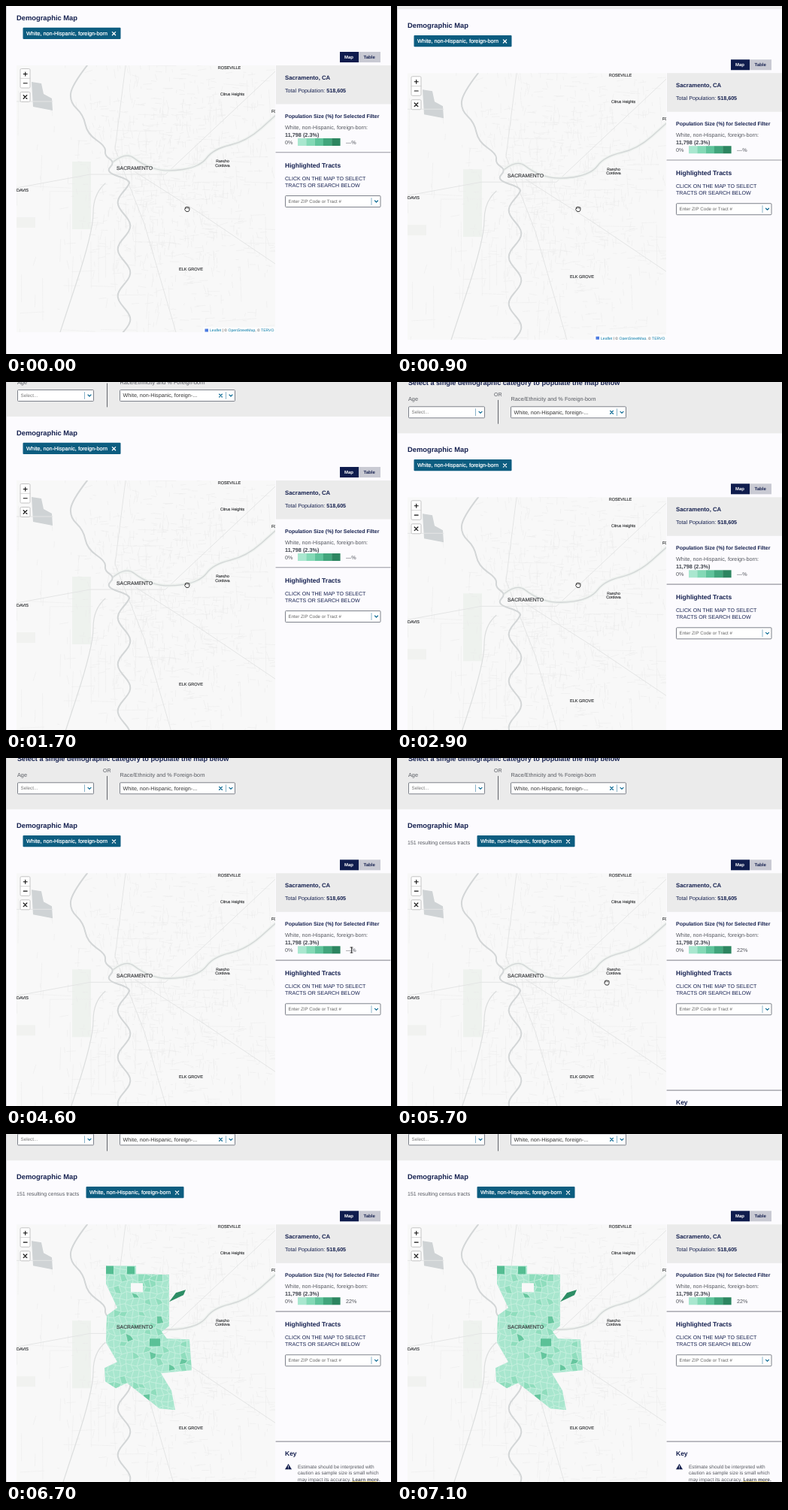
Animation of 512x463 px, one loop 7200 ms. Source, as an HTML page:

```html
<!DOCTYPE html>
<html lang="en">
<head>
<meta charset="utf-8">
<title>Demographic Map</title>
<style>
  html, body { margin: 0; width: 100%; height: 100%; overflow: hidden; background: #fcfbfe; }
  svg { display: block; width: 512px; height: 463px; }
  text { font-family: "Liberation Sans", Arial, sans-serif; text-rendering: geometricPrecision; white-space: pre; }
  path { fill: none; stroke-linecap: round; stroke-linejoin: round; }
</style>
</head>
<body>
<svg id="stage" viewBox="0 0 512 463"></svg>
<script>
const NAVY = '#15204f', GREY = '#55585f', BLUE = '#0c6a94', WATER = '#d3d6d7';
const LOOP = 7200, STEP = 100;
const RESULTS_AT = 4700, TRACTS_AT = 6700;

let seed = 11;
const rnd = () => (seed = (seed * 16807) % 2147483647) / 2147483647;
const spread = () => rnd() + rnd() + rnd() - 1.5;

const rect = (x, y, w, h, fill, extra = '') =>
  `<rect x="${x}" y="${y}" width="${w}" height="${h}" fill="${fill}" ${extra}/>`;
const path = (d, stroke, width = 1) => `<path d="${d}" stroke="${stroke}" stroke-width="${width}"/>`;
const poly = (points, fill, extra = '') => `<polygon points="${points}" fill="${fill}" ${extra}/>`;

// y is the middle of the capital letters
const text = (x, y, size, content, fill = GREY, extra = '') =>
  `<text x="${x}" y="${y + size * .36}" font-size="${size}" fill="${fill}" ${extra}>${content}</text>`;
const bold = (x, y, size, content, fill = NAVY) => text(x, y, size, content, fill, 'font-weight="700"');
const place = (x, y, size, content) =>
  text(x, y, size, content, '#3f4043', 'text-anchor="middle" stroke="#3f4043" stroke-width=".2"');

const chevron = (x, y) => path(`M${x - 2} ${y - 1}l2 2 2-2`, BLUE, 1.2);
const cross = (x, y, r, stroke) =>
  path(`M${x - r} ${y - r}l${2 * r} ${2 * r}m0 ${-2 * r}l${-2 * r} ${2 * r}`, stroke, 1.3);
const button = (y, h) => rect(19, y, 13, h, '#fff', 'stroke="#c4c4c4" rx="1.5"');

function curve(points, stroke, width) {
  let d = 'M' + points[0];
  for (let i = 1; i < points.length - 1; i++) {
    const [x, y] = points[i], [nx, ny] = points[i + 1];
    d += `Q${x} ${y} ${(x + nx) / 2} ${(y + ny) / 2}`;
  }
  return path(d + 'L' + points[points.length - 1], stroke, width);
}

function select(x, y, w, label, size, fill) {
  return rect(x + .5, y + .5, w - 1, 15, '#fff', 'stroke="#70747e" stroke-width=".9" rx="1"') +
    text(x + 4.5, y + 7.8, size, label, fill) +
    path(`M${x + w - 12.5} ${y + 3.5}v9`, '#6ba0bb', .8) + chevron(x + w - 6, y + 8);
}

function streets() {
  const line = (x, y, len, tilt) => rnd() < .5 ? `M${x} ${y}l${len} ${tilt}` : `M${x} ${y}l${-tilt} ${len}`;
  let main = '', fine = '';
  for (let i = 0; i < 90; i++)
    main += line(14 + rnd() * 344, 79 + rnd() * 355, 12 + rnd() * 50, spread() * 3);
  for (let i = 0; i < 1100; i++) {
    const len = 2 + rnd() * 10;
    fine += line(225 + spread() * 135, 225 + spread() * 190, len, len * spread() * .3);
  }
  return path(main, '#ececec', .6) + path(fine, '#e8e9e9', .5);
}

function rivers() {
  const sacramento = [[108, 79], [87, 106], [85, 128], [103, 145], [108, 170], [133, 187], [131, 199],
    [145, 208], [132, 221]];
  for (let y = 232; y <= 440; y += 8)
    sacramento.push([157 + 9 * Math.sin((y - 277) / 9.9), y]);
  const american = [[143, 207], [160, 194], [181, 211], [212, 221], [258, 214], [276, 190], [320, 180], [358, 146]];
  const channel = [[132, 236], [116, 250], [116, 300], [72, 434]];
  return curve(channel, '#dcdede', 1.2) + curve(american, '#eef2ef', 4) +
    curve(american, WATER, 1.3) + curve(sacramento, WATER, 2);
}

// A jittered grid of shaded cells, cut to the city boundary
function tracts() {
  const outline = '133,134 173,134 173,145 217,146 217,214 207,222 214,231 244,232 247,273 206,277 ' +
    '220,300 225,326 204,324 161,290 146,297 132,288 131,270 148,262 133,236 134,200 148,190 133,158';
  const node = (c, r) => [
    128 + c * 8 + Math.sin(c * 7.1 + r * 3.7) * 2,
    130 + r * 8 + Math.sin(c * 4.3 + r * 8.9) * 2
  ].map(v => v.toFixed(1)).join();
  let cells = '';
  for (let r = 0; r < 25; r++) for (let c = 0; c < 15; c++) {
    const k = rnd(), fill = k < .8 ? '#a8e6ce' : k < .97 ? '#8fddbd' : '#65c69e';
    cells += poly([node(c, r), node(c + 1, r), node(c + 1, r + 1), node(c, r + 1)].join(' '),
      fill, 'stroke="#c8f0e0" stroke-width=".6"');
  }
  return `<clipPath id="city"><polygon points="${outline}"/></clipPath>
    <g id="tracts"><g clip-path="url(#city)">${cells}
    ${rect(133, 134, 10, 11, '#54bd92')}${rect(161, 135, 10, 10, '#54bd92')}
    ${rect(191, 231, 14, 10, '#5bc197')}${rect(166, 157, 16, 12, '#f8f8f8')}</g>
    ${poly('217,182 226,170 239,166 236,173', '#2d8d65')}</g>`;
}

function map() {
  return `<clipPath id="frame">${rect(14, 79, 344, 355, '#000')}</clipPath><g clip-path="url(#frame)">` +
    rect(14, 79, 344, 355, '#f8f8f8') + rect(88, 207, 25, 90, '#eef2ee') + rect(14, 281, 25, 14, '#f1f2f0') +
    streets() + poly('34,101 47,103 50,117 61,123 62,139 36,134', '#cfd3d5') +
    path('M14 242L112 224H212L358 87M159 79L145 190 184 290 226 434M14 127H62M172 221L260 277 358 343', '#e4e5e5') +
    rivers() + tracts() +
    place(297, 82, 5.5, 'ROSEVILLE') + place(301, 117, 5.1, 'Citrus Heights') +
    place(364.5, 140, 5.5, 'FOLSOM') + place(288, 206.5, 5.1, 'Rancho') + place(288, 212, 5.1, 'Cordova') +
    place(171, 215.5, 6.8, 'SACRAMENTO') + place(22, 245, 5.5, 'DAVIS') + place(246, 350, 5.5, 'ELK GROVE') +
    rect(262, 427.5, 96, 7, '#fff', 'opacity=".75"') + rect(264.5, 429.5, 4.5, 4, '#4c7be1') +
    text(271, 431.6, 5.07, 'Leaflet<tspan fill="#444"> | © </tspan>OpenStreetMap' +
      '<tspan fill="#444">, © </tspan>TERVO', '#0078a8') +
    button(83.5, 25.5) + path('M19 96.3h13', '#ccc', .8) +
    path('M23.2 90.5h5M25.7 88v5M23.2 102.8h5', '#111', 1.1) +
    button(114.5, 13) + cross(25.5, 121, 2.3, '#222') + '</g>';
}

function filters() {
  return rect(0, -300, 512, 294, '#ebebeb') +
    bold(15, -74, 9.15, 'Select a single demographic category to populate the map below') +
    text(15, -51.5, 7.3, 'Age') + text(129, -58, 7, 'OR') +
    path('M134.5 -50v31', GREY, .9) +
    text(151.5, -51.5, 7.3, 'Race/Ethnicity and % Foreign-born') +
    select(15, -42, 102, 'Select...', 6.3, '#777') +
    select(151, -42, 154, 'White, non-Hispanic, foreign-...', 7.2, '#333') +
    cross(285.5, -34, 1.9, BLUE);
}

function heading() {
  return bold(14, 15.5, 9.35, 'Demographic Map') +
    `<g id="pill">${rect(22.5, 28.7, 130, 15.3, '#0d5d80', 'rx="1"')}` +
    text(27, 36.2, 7.25, 'White, non-Hispanic, foreign-born', '#fff', 'stroke="#fff" stroke-width=".2"') +
    cross(143.5, 36.7, 2.1, '#fff') + '</g>' +
    rect(444, 61, 25, 14, '#0f1c4d') + rect(469, 61, 29, 14, '#c9cad3') +
    bold(450, 68, 6, 'Map', '#fff') + bold(475.5, 68, 6, 'Table');
}

function panel() {
  const ramp = ['#a9e7cf', '#83d9b6', '#5fc39b', '#41a57c', '#2c8560'];
  const rule = y => path(`M359 ${y}h152`, '#97979f', 1.1);
  const note = ['Estimate should be interpreted with', 'caution as sample size is small which',
    'may impact its accuracy. <tspan font-weight="700">Learn more.</tspan>'];
  return rect(359, 79, 153, 51.5, '#ebebeb') +
    bold(371, 95, 7.8, 'Sacramento, CA') +
    text(371, 112, 7.2, 'Total Population: <tspan font-weight="700">518,605</tspan>', NAVY) +
    bold(371, 146, 6.97, 'Population Size (%) for Selected Filter') +
    text(371, 161.5, 7.25, 'White, non-Hispanic, foreign-born:') +
    bold(371, 171, 7.3, '11,798 (2.3%)', '#3f434c') +
    text(371, 181, 7.2, '0%') +
    ramp.map((c, i) => rect(388 + i * 11.3, 176, 11.4, 10, c)).join('') +
    `<g id="pending">${text(452, 181, 7.2, '—%')}</g>` +
    rule(194.8) +
    bold(371, 212, 8.5, 'Highlighted Tracts') +
    text(371, 229, 7.07, 'CLICK ON THE MAP TO SELECT', NAVY) +
    text(371, 238.5, 7.07, 'TRACTS OR SEARCH BELOW', NAVY) +
    select(371, 252, 127.5, 'Enter ZIP Code or Tract #', 6.2, '#666') +
    `<g id="results">${text(452, 181, 7.2, '22%')}${text(14, 38.5, 7, '151 resulting census tracts')}` +
    rule(367.8) + bold(371, 384, 8.5, 'Key') +
    poly('371,405 375.5,397.5 380,405', NAVY) + path('M375.5 400v2.4m0 1.3v.1', '#fff', .7) +
    note.map((s, i) => text(388, 401 + i * 8.5, 6.5, s)).join('') +
    path('M460 421.5h33', '#e8c94a', .9) + '</g>';
}

document.getElementById('stage').innerHTML =
  rect(0, 0, 512, 463, '#fcfbfe') +
  `<g id="page">${filters()}${heading()}${map()}${panel()}</g>` +
  path('M.5 0v463', '#d4d4d8') +
  `<g id="cursor"><g id="hand">
    <path d="M-2.6-.6V-2q.8-1 1.4 0 .3-1.4 1.4-.4 1-.8 1.4.3 1.3-.4 1.3.8V1Q2.6 2.3 1.8 3.4H-1.5L-3.4.6q0-1 .8-1.2z"
      style="fill:#fff" stroke="#222" stroke-width=".9"/>
    ${path('M-1.2-2v1.4M.2-2v1.4M1.6-1.8v1.2', '#222', .5)}</g>
    <g id="beam">${path('M-1.5-3.5h3M0-3.5v7M-1.5 3.5h3', '#222', .9)}</g></g>`;

const el = id => document.getElementById(id);
const show = (id, on) => el(id).setAttribute('visibility', on ? 'visible' : 'hidden');
const move = (id, x, y) => el(id).setAttribute('transform', `translate(${x} ${y})`);

const ramp = (t, from, length) => Math.min(1, Math.max(0, (t - from) / length));
const easeOut = (t, from, length) => 1 - (1 - ramp(t, from, length)) ** 2;

function draw(now) {
  const t = Math.floor((now % LOOP) / STEP) * STEP;
  const toPanel = ramp(t, 3000, 200), toLegend = ramp(t, 4200, 300), back = ramp(t, 5400, 400);
  const x = 241 + 206 * toPanel + 12.5 * toLegend - 240.5 * back;
  const y = 270 + 8 * toPanel - 22.5 * toLegend + 57.5 * back;
  const done = t >= RESULTS_AT, mapped = t >= TRACTS_AT;

  move('page', 0, 74.3 * easeOut(t, 750, 2100) - 33 * easeOut(t, 6300, 380));
  move('pill', done ? 84 : 0, 0);
  move('cursor', x, y);
  show('results', done);
  show('pending', !done);
  show('tracts', mapped);
  show('hand', !mapped && x < 359);
  show('beam', !mapped && x >= 359);
}

const start = performance.now();
function tick() {
  draw(performance.now() - start);
  requestAnimationFrame(tick);
}
tick();
</script>
</body>
</html>
```
